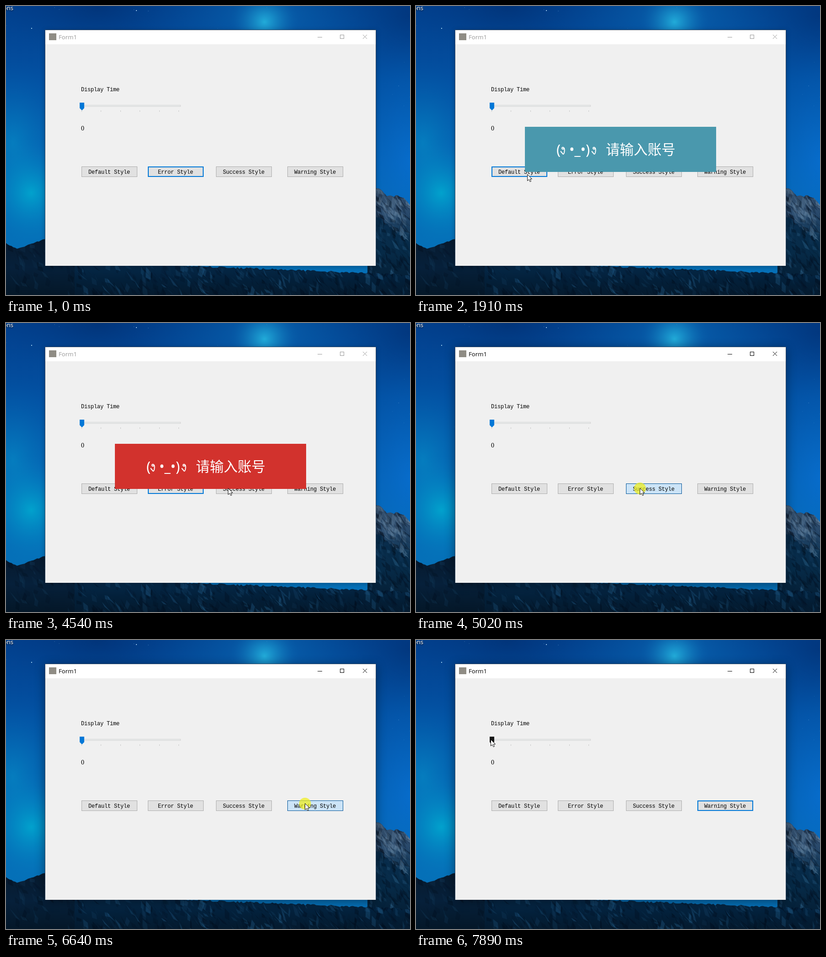
Write an HTML page with a canvas that moves like this. It is 883 by 634 pixels and loops after 8 s.

```html
<!DOCTYPE html>
<html lang="en">
<head>
<meta charset="utf-8">
<title>Toast styles</title>
<style>
html, body { margin: 0; width: 100%; height: 100%; overflow: hidden; background: #034a9c; }
canvas { display: block; }
</style>
</head>
<body>
<canvas id="stage" width="883" height="634"></canvas>
<script>
const W = 883, H = 634, LOOP = 8000;
const TICK = 75;          // pointer sampling interval
const TOAST_DELAY = 220;  // click to toast
const TOAST_END = 1250;   // click to toast gone
const MONO = '12px "Liberation Mono", monospace';
const BLUE = '#0078d7';

const buttons = [
  { x: 165, name: 'Default Style', click: 1680, color: '#4a98ad' },
  { x: 310, name: 'Error Style', click: 3380, color: '#d2322d' },
  { x: 459, name: 'Success Style', click: 5020, color: '#47a447' },
  { x: 615, name: 'Warning Style', click: 6640, color: '#ed9c28' }
];
const start = { x: 798, y: 685 };
const moves = [
  { from: 200, until: 980, x: 259, y: 386 },
  { from: 1050, until: 1440, x: 243, y: 369 },
  { from: 2290, until: 3000, x: 382, y: 361 },
  { from: 3930, until: 4710, x: 484 + 5, y: 362 },
  { from: 5480, until: 6100, x: 653, y: 358 },
  { from: 7190, until: 7890, x: 163, y: 218 }
];
const looks = {
  plain: ['#e1e1e1', '#adadad', 1],
  focus: ['#e1e1e1', BLUE, 2],
  hover: ['#e5f1fb', BLUE, 1],
  down: ['#cce4f7', '#005499', 1]
};

const stage = document.getElementById('stage');
let c;

function seeded(seed) {
  return () => (seed = (seed * 16807) % 2147483647) / 2147483647;
}

function poly(points, fill) {
  c.beginPath();
  points.forEach(p => c.lineTo(...p));
  c.closePath();
  c.fillStyle = fill;
  c.fill();
}

function rect(x, y, w, h, fill) {
  c.fillStyle = fill;
  c.fillRect(x, y, w, h);
}

function bordered(x, y, w, h, fill, edge, line = 1) {
  rect(x, y, w, h, edge);
  rect(x + line, y + line, w - 2 * line, h - 2 * line, fill);
}

function text(s, x, y, font, fill, align = 'left', spacing = 0) {
  c.font = font;
  c.fillStyle = fill;
  c.textAlign = align;
  c.letterSpacing = spacing + 'px';
  c.fillText(s, x, y);
}

const label = (s, x, y, align) => text(s, x, y, MONO, '#000', align, -0.2);

function vertical(y0, y1, ...colors) {
  const g = c.createLinearGradient(0, y0, 0, y1);
  colors.forEach((k, i) => g.addColorStop(i / (colors.length - 1), k));
  return g;
}

function glow(x, y, rx, ry, rgb, alpha) {
  c.save();
  c.translate(x, y);
  c.scale(rx, ry);
  const g = c.createRadialGradient(0, 0, 0, 0, 0, 1);
  for (let i = 0; i <= 8; i++) g.addColorStop(i / 8, `rgba(${rgb},${alpha * (1 - i / 8) ** 1.8})`);
  c.fillStyle = g;
  c.fillRect(-1, -1, 2, 2);
  c.restore();
}

// Jagged slope through a few key points, covered with random rock facets.
function ridge(keys, rough, fill, facets, light, seed) {
  const rnd = seeded(seed), line = [];
  const [left, top] = [keys[0][0], Math.min(...keys.map(k => k[1]))];
  const width = keys[keys.length - 1][0] - left;
  keys.slice(1).forEach(([x1, y1], i) => {
    const [x0, y0] = keys[i];
    for (let x = x0; x < x1; x += 4) {
      line.push([x, y0 + (y1 - y0) * (x - x0) / (x1 - x0) + (rnd() - 0.5) * rough]);
    }
  });
  c.save();
  poly([...line, keys[keys.length - 1], [left + width, H], [left, H]], fill);
  c.clip();
  for (let i = 0; i < facets; i++) {
    const x = left + rnd() * width, y = top + rnd() * (H - top);
    const w = 3 + rnd() * 9, h = 8 + rnd() * 24, lean = (rnd() - 0.25) * h;
    const tone = rnd() < 0.4 ? `rgba(${light},${rnd() * 0.3})` : `rgba(0,14,30,${rnd() * 0.5})`;
    poly([[x, y], [x + w, y + h * 0.4], [x + lean + w, y + h], [x + lean, y + h * 0.8]], tone);
  }
  c.restore();
}

function paintBackdrop() {
  rect(0, 0, W, H, vertical(0, 520, '#023f8c', '#0352a4', '#0562b4', '#0570b8'));
  glow(W, 340, 150, 300, '8,112,212', 0.7);
  glow(W, 20, 200, 150, '1,45,110', 0.5);
  glow(200, 0, 220, 130, '1,42,104', 0.5);
  glow(570, 20, 330, 180, '12,120,196', 0.6);
  glow(565, 35, 75, 70, '40,190,228', 0.8);
  glow(15, 300, 130, 190, '5,145,200', 0.6);
  glow(55, 410, 110, 120, '0,180,212', 0.75);
  const rnd = seeded(77);
  for (let i = 0; i < 34; i++) {
    rect(rnd() * W, rnd() * 330, 1, 1, `rgba(190,225,255,${0.15 + rnd() * 0.35})`);
  }
  rect(55, 48, 2, 2, '#9fd0f0');
  rect(284, 9, 2, 2, '#9fc8ee');

  ridge([[790, 380], [832, 416], [866, 419], [W, 436]], 6,
    vertical(392, H, '#3a536e', '#28486a', '#0c3454', '#062a45', '#041c32'), 420, '135,165,190', 9);
  ridge([[790, 445], [W, 520]], 8,
    vertical(450, H, 'rgba(7,44,76,.8)', '#062a47', '#04182b'), 160, '60,120,165', 31);
  ridge([[0, 521], [24, 533], [86, 511], [200, 560]], 2,
    vertical(511, H, '#071a2e', '#06203a', '#041728'), 90, '25,70,105', 5);
  ridge([[150, 560], [W, 590]], 4,
    vertical(565, H, '#05294a', '#03203a', '#041a2e'), 420, '45,115,165', 17);

  c.shadowColor = '#000';
  c.shadowBlur = 3;
  c.shadowOffsetY = 1;
  text('ons', 16, 9, '13px "Noto Sans", sans-serif', '#fff', 'right');
}

function paintWindow(active) {
  c.save();
  c.shadowColor = active ? 'rgba(0,0,0,.42)' : 'rgba(0,0,0,.28)';
  c.shadowBlur = active ? 20 : 10;
  c.shadowOffsetY = active ? 4 : 2;
  rect(85, 52, 724, 518, '#3c5068');
  c.restore();
  rect(86, 53, 722, 31, '#fff');
  rect(86, 84, 722, 486, '#f0f0f0');

  const ink = active ? '#000' : '#999';
  rect(94, 60, 16, 15, '#8f8c84');
  text('Form1', 115, 73, '13.2px "Open Sans", "Noto Sans", sans-serif', ink);
  rect(681, 68, 10, 1, ink);
  bordered(730, 63, 9, 9, '#fff', ink);
  c.strokeStyle = ink;
  c.lineWidth = 1;
  c.beginPath();
  c.moveTo(780, 63);
  c.lineTo(789, 72);
  c.moveTo(789, 63);
  c.lineTo(780, 72);
  c.stroke();
}

function paintSlider(hot) {
  label('Display Time', 164, 187);
  bordered(162, 217, 220, 4, '#e7eaea', '#d6d6d6');
  for (let i = 0; i < 6; i++) rect(165 + Math.round(i * 42.4), 229, 1, 3, '#c4c4c4');
  poly([[161, 212], [171, 212], [171, 224], [166, 229], [161, 224]], hot ? '#171717' : BLUE);
  text('0', 164, 273, '14px "Liberation Serif", serif', '#000');
}

function paintButton({ x, name }, look) {
  bordered(x, 352, 122, 23, ...looks[look]);
  label(name, x + 60.5, 368, 'center');
}

// Thai letter ngo ngu
function ngo(x) {
  c.lineWidth = 2;
  c.strokeStyle = '#fff';
  c.beginPath();
  c.arc(x + 6, 312, 2, 0, 7);
  c.moveTo(x + 8, 311);
  c.quadraticCurveTo(x + 10, 313, x + 9.5, 318);
  c.quadraticCurveTo(x + 9, 325, x + 6.5, 325);
  c.lineTo(x + 1, 318.5);
  c.stroke();
}

function paintToast(fill) {
  const face = '30px "Noto Sans", "Open Sans", sans-serif';
  rect(238, 265, 418, 99, fill);
  text('(', 307, 326, face, '#fff');
  ngo(315);
  text('•_•)', 335, 326, face, '#fff');
  ngo(383);
  text('请输入账号', 415, 326, '300 30.4px "Noto Sans CJK SC", "Noto Sans CJK", sans-serif', '#fff');
}

function pointerAt(t) {
  const i = moves.findLastIndex(m => t >= m.from);
  if (i < 0) return null;
  const to = moves[i], origin = moves[i - 1] || start;
  const gaps = Math.round((to.until - to.from) / TICK);
  const step = Math.floor((t - to.from) / (to.until - to.from) * gaps + 0.001);
  const left = (1 - Math.min(1, (step + 1) / (gaps + 1))) ** 2.5;
  const ease = k => Math.round(to[k] + (origin[k] - to[k]) * left);
  return { x: ease('x'), y: ease('y') };
}

function paintPointer({ x, y }) {
  c.save();
  c.translate(x + 0.5, y + 0.5);
  poly([[0, 0], [0, 14], [3.3, 11], [5.7, 16], [8, 15], [5.8, 10.2], [10, 10]], '#fff');
  c.strokeStyle = '#111';
  c.lineWidth = 1;
  c.stroke();
  c.restore();
}

function paintClick({ x, y }) {
  c.fillStyle = 'rgba(240,238,20,.7)';
  c.beginPath();
  c.arc(x + 0.5, y + 1, 13, 0, 7);
  c.fill();
}

const backdrop = document.createElement('canvas');
backdrop.width = W;
backdrop.height = H;
c = backdrop.getContext('2d');
paintBackdrop();
c = stage.getContext('2d');

function frame(now) {
  const t = now % LOOP;
  const tip = pointerAt(t);
  const last = buttons.findLast(b => t >= b.click);
  const age = last ? t - last.click : 0;
  const pressed = last && age < TOAST_DELAY;
  const toast = last && !pressed && age < TOAST_END;
  const focus = last || buttons[1];
  const over = (x, y, w, h) =>
    tip && !toast && tip.x >= x && tip.x < x + w && tip.y >= y && tip.y < y + h;
  const lookOf = b => pressed && b === last ? 'down'
    : over(b.x, 352, 122, 23) ? 'hover'
    : b === focus ? 'focus' : 'plain';

  c.drawImage(backdrop, 0, 0);
  paintWindow(last && !toast);
  paintSlider(over(161, 211, 10, 18));
  buttons.forEach(b => paintButton(b, lookOf(b)));
  if (toast) paintToast(last.color);
  if (pressed) paintClick(tip);
  if (tip) paintPointer(tip);
  requestAnimationFrame(frame);
}
requestAnimationFrame(frame);
</script>
</body>
</html>
```
